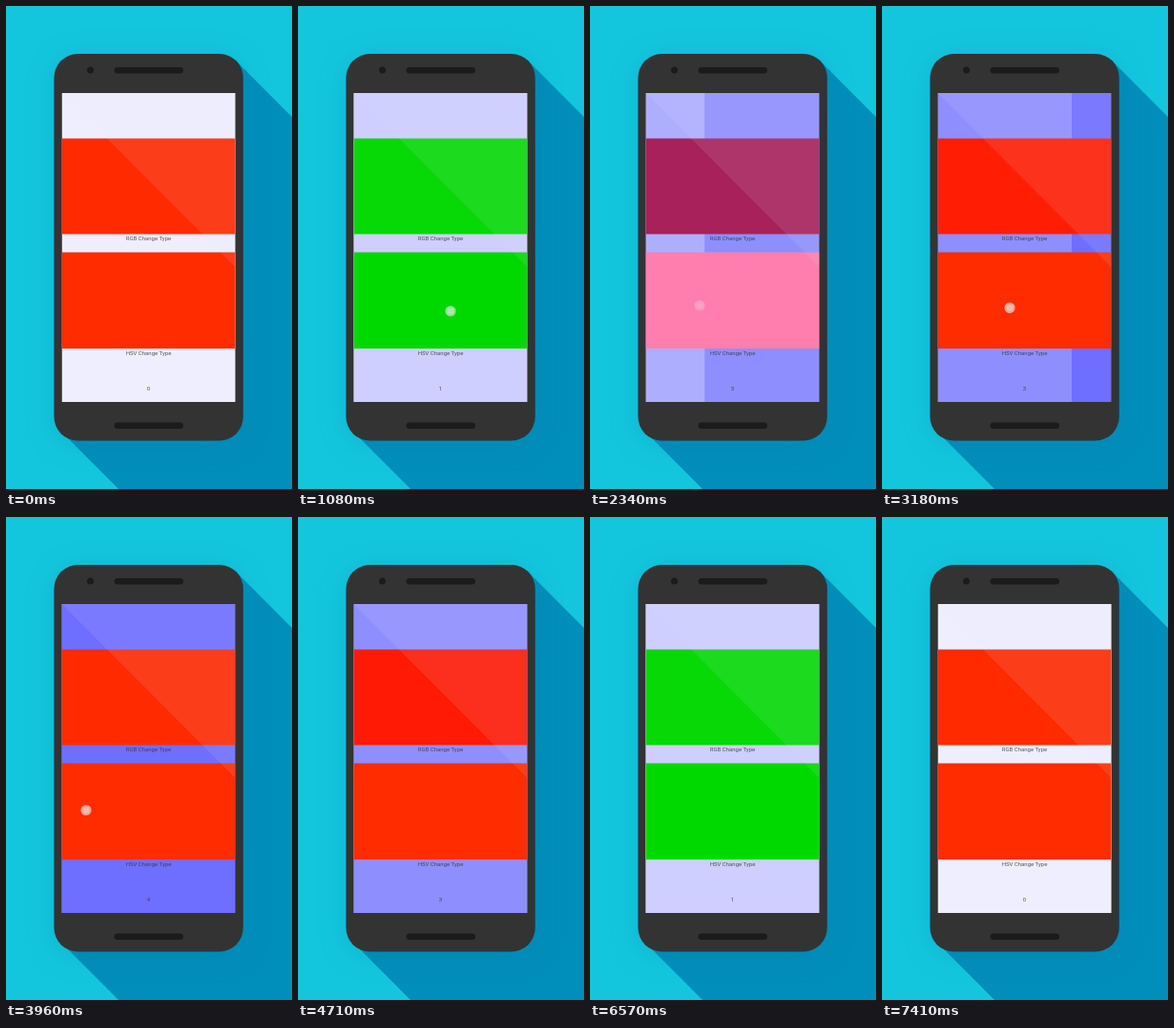
These frames come from a looping animation (300x505 px, 7.5 s). An HTML page:

```html
<!DOCTYPE html>
<html lang="en">
<head>
<meta charset="utf-8">
<title>Pager colour change</title>
<style>
  html, body { margin: 0; width: 100%; height: 100%; overflow: hidden; background: #13c6de; }
  svg { display: block; }
  text { font: 6px Roboto, sans-serif; fill: #333; fill-opacity: .8; text-anchor: middle; }
  .glow { filter: blur(14px); fill: #006f98; fill-opacity: .2; }
</style>
</head>
<body>
<svg width="300" height="505" viewBox="0 0 300 505">
  <rect width="300" height="505" fill="#13c6de"/>
  <path d="M241 57L300 116V505H118L59 446Z" fill="#008fba"/>
  <rect class="glow" x="50" y="54" width="199" height="404" rx="25"/>
  <rect x="50.4" y="50" width="198.4" height="404.5" rx="25" fill="#333"/>
  <g fill="#1b1b1b">
    <circle cx="88.5" cy="67" r="3.5"/>
    <rect x="113.5" y="64" width="72.5" height="6.5" rx="3.25"/>
    <rect x="113.5" y="435.5" width="72.5" height="6.5" rx="3.25"/>
  </g>
  <svg x="58.5" y="91" width="182" height="323" overflow="hidden">
    <g id="pages"></g>
    <rect id="rgb" y="47.5" width="182" height="100"/>
    <rect id="hsv" y="166.5" width="182" height="100.7"/>
    <text x="91" y="154.4">RGB Change Type</text>
    <text x="91" y="273.5">HSV Change Type</text>
    <text x="91" y="310.7" id="count">0</text>
    <path d="M0 0H182V182Z" fill="#dde" fill-opacity=".1"/>
  </svg>
  <g id="touch">
    <circle r="5.6" fill="#e4e4e4" fill-opacity=".65"/>
    <circle r="3.6" fill="#fff" fill-opacity=".25"/>
  </g>
</svg>
<script>
const LOOP = 7500, STEP = 30, WIDTH = 182, LAST = 4;
const DRAG = 250, SETTLE = 570, FADE = 110, DRAGGED = 0.395;

// The finger lifts at these times: four swipes forward, then four back
const releases = [330, 1330, 2278, 3240, 4210, 5240, 6000, 6970];
const direction = i => i < LAST ? 1 : -1;

const shades = [[255, 42, 0], [6, 217, 6], [0, 48, 255], [255, 26, 5], [255, 42, 0]];

const $ = id => document.getElementById(id);
const clamp = v => Math.min(1, Math.max(0, v));
const lerp = (a, b, k) => a + (b - a) * k;
const css = c => `rgb(${c.map(Math.round).join()})`;

const pages = shades.map((_, i) => {
  const tint = 238 - 32 * i;
  const page = document.createElementNS('http://www.w3.org/2000/svg', 'rect');
  page.setAttribute('width', WIDTH + 0.5);
  page.setAttribute('height', 323);
  page.setAttribute('fill', css([tint, tint, 255]));
  $('pages').append(page);
  return page;
});

function rgbColor(pos) {
  const i = Math.min(LAST - 1, Math.floor(pos));
  return shades[i].map((v, n) => lerp(v, shades[i + 1][n], pos - i));
}

// One third of the hue circle per page; green never drops out fully
function hsvColor(pos) {
  const hue = 2 * Math.min(3, pos);
  const value = 255 - 38 * clamp(1 - Math.abs(pos - 1));
  const [r, g, b] = [5, 3, 1].map(n => {
    const k = (n + hue) % 6;
    return value * (1 - clamp(Math.min(k, 4 - k)));
  });
  return [r, Math.max(g, 44 + 0.47 * Math.min(r, b)), b];
}

const drag = (t, release) => clamp((t - release + DRAG) / DRAG) ** 2;
const settle = (t, release) => 1 - (1 - clamp((t - release) / SETTLE)) ** 5;

function drawTouch(t) {
  const i = releases.findIndex(r => t >= r - DRAG && t < r + FADE);
  $('touch').setAttribute('opacity', i < 0 ? 0 : 1 - clamp((t - releases[i]) / FADE));
  if (i < 0) return;
  const k = drag(t, releases[i]), dir = direction(i);
  const x = (dir > 0 ? 160 : 84) - dir * 45 * k;
  const y = (dir > 0 ? 319 : 306.5) - dir * 6 * k;
  $('touch').setAttribute('transform', `translate(${x} ${y})`);
}

function draw(t) {
  let pos = 0, count = 0;
  releases.forEach((r, i) => {
    pos += direction(i) * lerp(settle(t, r), drag(t, r), DRAGGED);
    if (t >= r) count += direction(i);
  });
  pos = Math.min(LAST, Math.max(0, pos));
  pages.forEach((page, i) => page.setAttribute('x', (i - pos) * WIDTH));
  $('rgb').setAttribute('fill', css(rgbColor(pos)));
  $('hsv').setAttribute('fill', css(hsvColor(pos)));
  $('count').textContent = count;
  drawTouch(t);
}

const origin = performance.now();
function tick() {
  const t = (performance.now() - origin) % LOOP;
  draw(Math.floor(t / STEP) * STEP);
  requestAnimationFrame(tick);
}
tick();
</script>
</body>
</html>
```
